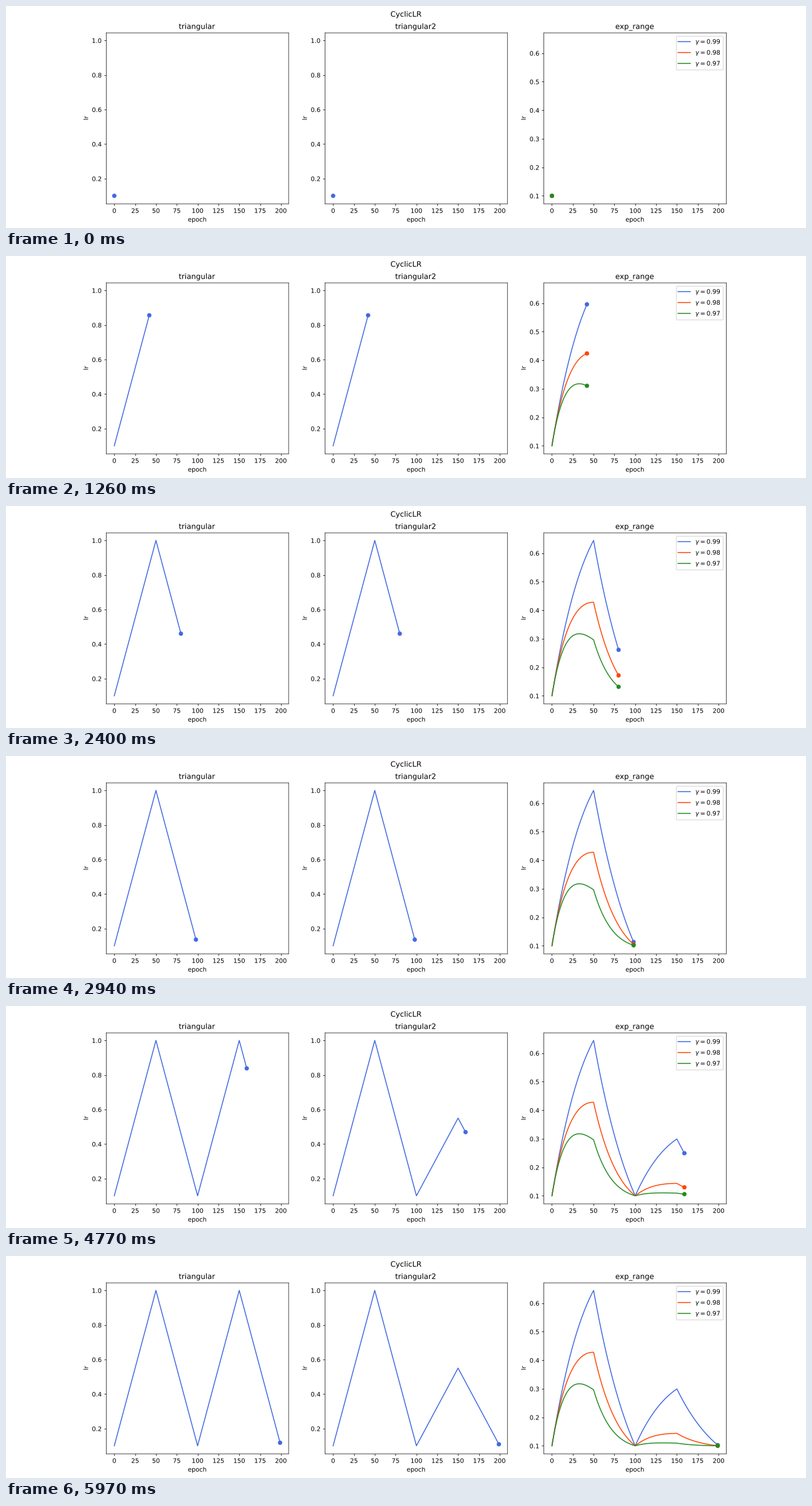
A matplotlib script that plays this animation: 1280x356 px, repeating every 6 s.

```python
import matplotlib.pyplot as plt
import numpy as np
from matplotlib.animation import FuncAnimation
from matplotlib.patheffects import Normal, Stroke

EPOCHS = 200
INTERVAL = 30
HALF_CYCLE = 50
BASE_LR, MAX_LR = 0.1, 1.0

plt.rcParams["font.family"] = "DejaVu Sans"
# Drawing through a path effect keeps text and dots at subpixel positions.
plt.rcParams["path.effects"] = [Normal()]

epochs = np.arange(EPOCHS)
cycle = epochs // (2 * HALF_CYCLE)
wave = 1 - np.abs(epochs / HALF_CYCLE - 2 * cycle - 1)


def cyclic_lr(scale):
    return BASE_LR + (MAX_LR - BASE_LR) * wave * scale


# The height is nudged up slightly so it never truncates below 356 pixels.
fig, axes = plt.subplots(1, 3, figsize=(18, 5.0063), dpi=1280 / 18)
fig.suptitle("CyclicLR")
traces = []


def add_trace(ax, rates, color, label=None):
    line, = ax.plot([], [], color=color, label=label)
    dot, = ax.plot([], [], "o", color=color)
    traces.append((line, dot, rates))


def setup_axes(ax, title, top):
    ax.set_title(title)
    ax.set_xlabel("epoch")
    ax.set_ylabel("lr")
    x_pad = 0.05 * (EPOCHS - 1)
    y_pad = 0.05 * (top - BASE_LR)
    ax.set_xlim(-x_pad, EPOCHS - 1 + x_pad)
    ax.set_ylim(BASE_LR - y_pad, top + y_pad)
    # A soft frame: unsnapped, with its stroke just inside the pixel edge.
    for spine in ax.spines.values():
        spine.set(snap=False, linewidth=0.72,
                  path_effects=[Stroke(offset=(0.36, -0.36))])


triangular, triangular2, exp_range = axes

setup_axes(triangular, "triangular", MAX_LR)
add_trace(triangular, cyclic_lr(1), "royalblue")

setup_axes(triangular2, "triangular2", MAX_LR)
add_trace(triangular2, cyclic_lr(0.5 ** cycle), "royalblue")

setup_axes(exp_range, "exp_range", cyclic_lr(0.99 ** epochs).max())
for gamma, color in ((0.99, "royalblue"), (0.98, "orangered"), (0.97, "forestgreen")):
    add_trace(exp_range, cyclic_lr(gamma ** epochs), color, rf"$\gamma={gamma}$")
legend = exp_range.legend(loc="upper right", borderpad=0.3, labelspacing=0.35)
for handle in legend.get_lines():
    handle.set_snap(False)


def update(epoch):
    artists = []
    for line, dot, rates in traces:
        line.set_data(epochs[:epoch + 1], rates[:epoch + 1])
        dot.set_data([epoch], [rates[epoch]])
        artists += [line, dot]
    return artists


anim = FuncAnimation(fig, update, frames=EPOCHS, interval=INTERVAL, repeat=True)

plt.show()
```
